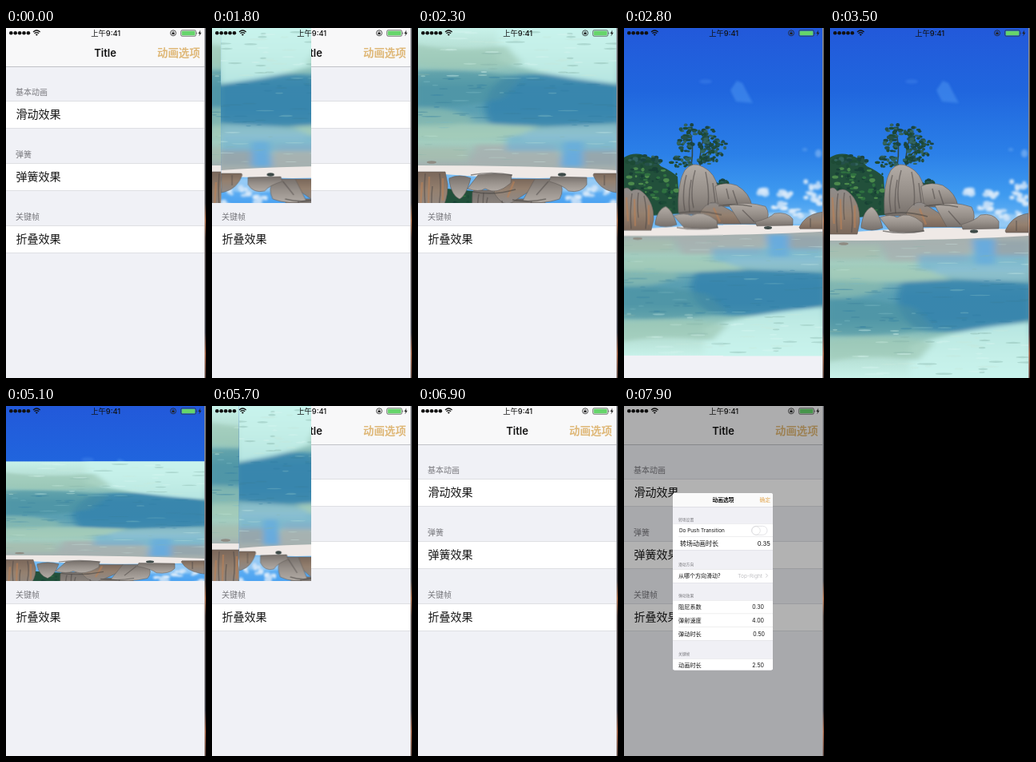
Animation of 250 by 438 pixels, one loop 8 s. Source, as an HTML page:

```html
<!DOCTYPE html>
<html lang="zh-CN">
<head>
<meta charset="utf-8">
<title>Fold transition</title>
<style>
html, body { margin: 0; width: 100%; height: 100%; overflow: hidden; background: #f0f1f6; }
svg { display: block; width: 100vw; height: 100vh; }
text { font-family: Inter, "Noto Sans CJK SC", "Noto Sans CJK", sans-serif; white-space: pre; }
</style>
</head>
<body>
<svg viewBox="0 0 250 438" preserveAspectRatio="none">
  <defs>
    <linearGradient id="sky" x2="0" y2="1">
      <stop stop-color="#2259da"/><stop offset=".3" stop-color="#2066de"/>
      <stop offset=".6" stop-color="#2b80e8"/><stop offset=".8" stop-color="#3f9bf0"/>
      <stop offset="1" stop-color="#82c4f6"/>
    </linearGradient>
    <linearGradient id="sea" x2="0" y2="1">
      <stop stop-color="#a7adac"/><stop offset=".1" stop-color="#9fbab6"/>
      <stop offset=".2" stop-color="#a3cdbf"/><stop offset=".3" stop-color="#79b1b8"/>
      <stop offset=".42" stop-color="#5a9fb2"/><stop offset=".58" stop-color="#5b9fae"/>
      <stop offset=".72" stop-color="#94c6bd"/><stop offset=".85" stop-color="#b5ded3"/>
      <stop offset="1" stop-color="#c8f2ea"/>
    </linearGradient>
    <linearGradient id="rock" x2="0" y2="1">
      <stop stop-color="#b3aca6"/><stop offset=".55" stop-color="#968f89"/><stop offset="1" stop-color="#77706b"/>
    </linearGradient>
    <linearGradient id="warm" x2="0" y2="1">
      <stop stop-color="#8f8c8b"/><stop offset=".6" stop-color="#94806f"/><stop offset="1" stop-color="#7a675a"/>
    </linearGradient>
    <linearGradient id="edge" x2="0" y2="1">
      <stop stop-color="#55565a"/><stop offset=".5" stop-color="#3c3b3e"/>
      <stop offset=".55" stop-color="#a0623e"/><stop offset=".6" stop-color="#443a38"/>
      <stop offset=".87" stop-color="#33333a"/><stop offset=".93" stop-color="#96573a"/>
      <stop offset="1" stop-color="#4a3630"/>
    </linearGradient>
    <filter id="soft" x="-50%" y="-50%" width="200%" height="200%"><feGaussianBlur stdDeviation="1.5"/></filter>
    <filter id="haze" x="-30%" y="-60%" width="160%" height="220%"><feGaussianBlur stdDeviation="5 2.5"/></filter>
    <clipPath id="frame"><rect width="248" height="438"/></clipPath>
    <clipPath id="topLeft"><rect width="124" height="219"/></clipPath>
    <clipPath id="topRight"><rect x="124" width="124" height="219"/></clipPath>
    <clipPath id="lowLeft"><rect y="219" width="124" height="219"/></clipPath>
    <clipPath id="lowRight"><rect x="124" y="219" width="124" height="219"/></clipPath>
    <clipPath id="card"><rect x="61" y="109" width="125" height="221.5" rx="2.5"/></clipPath>
    <g id="photo" clip-path="url(#frame)"></g>
  </defs>

  <g id="list"></g>

  <g id="book">
    <use href="#photo" clip-path="url(#topLeft)"/>
    <g class="low"><use href="#photo" clip-path="url(#lowLeft)"/></g>
    <g id="right">
      <use href="#photo" clip-path="url(#topRight)"/>
      <g class="low"><use href="#photo" clip-path="url(#lowRight)"/></g>
    </g>
  </g>

  <g id="status"></g>
  <rect id="dim" width="248" height="438"/>
  <g id="panel"><g id="panelBody" clip-path="url(#card)"></g></g>
  <rect x="248.4" width="1.6" height="438" fill="url(#edge)"/>
</svg>

<script>
const LOOP = 8000, FOLD = 588;
const NS = 'http://www.w3.org/2000/svg';
const $ = id => document.getElementById(id);

function add(parent, tag, attrs, content) {
  const el = document.createElementNS(NS, tag);
  for (const k in attrs) el.setAttribute(k, attrs[k]);
  if (content) el.textContent = content;
  parent.appendChild(el);
  return el;
}
const rect = (p, x, y, width, height, fill, more) => add(p, 'rect', { x, y, width, height, fill, ...more });
const path = (p, d, fill, more) => add(p, 'path', { d, fill, ...more });
const blob = (p, cx, cy, rx, ry, fill, more) => add(p, 'ellipse', { cx, cy, rx, ry, fill, ...more });
const text = (p, s, x, y, size, fill, more) => add(p, 'text', { x, y, 'font-size': size, fill, ...more }, s);

function makeRandom(seed) {
  return () => (seed = (seed * 16807) % 2147483647) / 2147483647;
}

const rnd = makeRandom(41);

// Small leaves or puffs scattered inside an ellipse
function scatter(g, [x, y, rx, ry], count, size, colours) {
  for (let i = 0; i < count; i++) {
    const a = rnd() * 2 * Math.PI, r = Math.sqrt(rnd());
    blob(g, x + rx * r * Math.cos(a), y + ry * r * Math.sin(a),
      size * (.6 + rnd() * .6), size * (.4 + rnd() * .5), colours[i % colours.length]);
  }
}

function drawSky(g) {
  rect(g, 0, 0, 248, 262, 'url(#sky)');
  const clouds = add(g, 'g', { filter: 'url(#soft)' });
  blob(clouds, 102, 67, 8, 2.5, '#4f8ff0', { opacity: .35 });
  path(clouds, 'M133 78L141 66L148 69L153 79L161 94L140 92Z', '#4a94f0', { opacity: .55 });
  blob(clouds, 243, 157, 4, 5, '#7db4f4', { opacity: .7 });
  blob(clouds, 226, 152, 3, 2, '#7db4f4', { opacity: .4 });
  blob(clouds, 205, 241, 50, 9, '#a5d2f6', { opacity: .7 });
  const puffs = add(g, 'g', { filter: 'url(#soft)', opacity: .85 });
  for (const p of [[173, 207, 6, 5], [200, 208, 10, 4], [236, 199, 12, 13], [238, 214, 13, 7], [194, 223, 14, 4], [220, 233, 18, 5]])
    scatter(puffs, p, 9, 4, ['#e9f2fb', '#d4e6f8', '#f4f8fc']);
}

function drawTrees(g) {
  path(g, 'M84 172Q88 148 82 130M95 174Q94 148 103 130M96 162Q106 154 118 148', 'none',
    { stroke: '#2f4646', 'stroke-width': 1.6 });
  const dark = ['#1b443f', '#255049', '#1d4a35', '#32625c'];
  for (const p of [[80, 129, 10, 9], [77, 144, 9, 12], [104, 132, 11, 10], [101, 146, 9, 10], [118, 149, 11, 11], [72, 167, 16, 8], [105, 164, 13, 8], [122, 194, 8, 4]])
    scatter(g, p, 24, 2.8, dark);
  path(g, 'M0 162Q12 155 24 159Q38 162 46 173Q58 178 67 186L70 234L0 240Z', '#22503b');
  scatter(g, [24, 166, 25, 7], 30, 3, dark);
  for (let i = 0; i < 90; i++) {
    const x = rnd() * 66;
    blob(g, x, 167 + x * .22 + rnd() * 50, 1 + rnd() * 3, 1 + rnd() * 1.6,
      ['#2f7140', '#183f35', '#1b4a36', '#4c8a4c'][i % 4]);
  }
}

function drawSea(g) {
  rect(g, 0, 260, 248, 178, 'url(#sea)');
  const bands = add(g, 'g', { filter: 'url(#haze)' });
  const band = (d, fill, opacity) => path(bands, d, fill, { opacity });
  band('M64 266H180L170 292H72Z', '#a9b0b0', .75);
  band('M178 264H206V296H182Z', '#5fa9e4', .85);
  band('M206 266H250V286H206Z', '#94a3ac', .8);
  band('M110 284H250V305H110Z', '#6cb0d8', .6);
  band('M-5 272H62V288H-5Z', '#a9bfae', .7);
  band('M-5 300Q70 294 130 304L150 314Q60 322 -5 316Z', '#a8cfba', .8);
  band('M130 298H250V316Q180 318 130 308Z', '#8fc4d6', .6);
  band('M90 318Q170 312 252 320V364Q200 386 110 378Q70 350 90 318Z', '#2c7eac', .75);
  band('M-5 340Q50 336 105 350L130 376Q60 388 -5 384Z', '#4a92a2', .6);
  band('M-5 316Q40 312 72 322Q50 340 -5 338Z', '#8abdb0', .7);
  band('M100 398Q170 374 252 368V440H100Z', '#c8f4ee', .8);
  band('M-5 392Q60 382 130 394L110 416Q50 406 -5 418Z', '#9dc8b6', .7);
  for (let i = 0; i < 130; i++) {
    const near = rnd(), deep = near > .25 && near < .65;
    blob(g, rnd() * 248, 270 + near * 164, 3 + rnd() * 11, .4 + near * .9,
      deep ? ['#2f7ca2', '#7bb8c2', '#39809c'][i % 3] : ['#c6e8dd', '#87b5aa', '#d6f5ef'][i % 3],
      { opacity: .4 });
  }
}

function drawShore(g) {
  path(g, 'M0 258Q80 250 150 250L248 252V260Q150 266 0 266Z', '#efe9e6');
  const rocks = [
    ['M0 201Q5 198 9 204Q17 199 24 206Q38 218 37 243L34 258H0Z', 'warm'],
    ['M68 232Q66 194 76 178Q86 166 99 174Q114 181 118 202L125 235H70Z', 'rock'],
    ['M114 198Q126 192 141 197Q158 207 160 224H118Z', 'rock'],
    ['M39 247Q42 228 52 224Q60 228 66 250Q52 256 39 250Z', 'rock'],
    ['M95 232Q107 211 121 222L146 238V249H100Z', 'warm'],
    ['M131 222Q154 216 177 224Q184 236 176 249H146Z', 'rock'],
    ['M62 237Q76 232 84 237Q98 228 116 244L117 254Q94 257 75 254Z', 'rock'],
    ['M164 246Q182 241 188 234Q204 231 211 242V251L166 252Z', 'rock'],
    ['M219 254Q226 237 243 233L248 232V256H220Z', 'warm']
  ];
  for (const [d, fill] of rocks) path(g, d, `url(#${fill})`, { stroke: '#5f5a56', 'stroke-width': .6 });
  path(g, 'M78 184Q72 206 76 230M84 190Q80 210 82 232M89 178Q82 204 87 226M102 180Q107 204 105 222M111 194L114 218M10 207Q7 230 9 256M18 206Q16 222 18 240M25 210Q30 232 27 256M128 201L131 214M136 203L142 221M148 229L163 246M233 241V254',
    'none', { stroke: '#4f4a47', 'stroke-width': 1.5, opacity: .55 });
  path(g, 'M3 212L5 245M13 214L14 252M31 222L31 250M112 226L120 246', 'none',
    { stroke: '#b98058', 'stroke-width': 2.5, opacity: .6 });
  path(g, 'M69 233Q95 228 122 236M118 223Q140 219 160 224M66 254Q92 259 118 254', 'none',
    { stroke: '#4a4744', 'stroke-width': 1.6, opacity: .6 });
  blob(g, 180, 254.5, 5, 2.2, '#3e4a48');
  blob(g, 17, 270, 6, 1.8, '#8e8b82');
}

function drawPhoto(g) {
  drawSky(g);
  drawTrees(g);
  drawSea(g);
  drawShore(g);
}

let highlight;
function drawList(g) {
  rect(g, 0, 0, 250, 438, '#f0f1f6');
  rect(g, 0, 0, 248, 48, '#f8f8f9');
  rect(g, 0, 48, 248, .7, '#aeafb3');
  text(g, 'Title', 124, 36, 13, '#111', { 'font-weight': 600, 'text-anchor': 'middle' });
  text(g, '动画选项', 189, 36, 13.4, '#dfb878', { 'font-weight': 700 });
  [['基本动画', '滑动效果'], ['弹簧', '弹簧效果'], ['关键帧', '折叠效果']].forEach(([head, label], i) => {
    const y = 91.5 + i * 78;
    text(g, head, 12, y - 7.7, 10, '#77777c');
    rect(g, 0, y, 248, 34, '#fff');
    if (i === 2) highlight = rect(g, 0, y, 248, 34, '#d9d9d9', { opacity: 0 });
    rect(g, 0, y - .2, 248, .6, '#cfcfd4');
    rect(g, 0, y + 33.7, 248, .6, '#cfcfd4');
    text(g, label, 12.5, y + 21.7, 14, '#161616');
  });
}

function drawStatus(g) {
  for (let i = 0; i < 5; i++) add(g, 'circle', { cx: 6.3 + i * 5.4, cy: 6.2, r: 2.3, fill: '#111' });
  path(g, 'M34 4.9Q38.3 1.2 42.6 4.9M35.5 6.8Q38.3 4.5 41.1 6.8', 'none', { stroke: '#111', 'stroke-width': 1.3 });
  path(g, 'M36.7 8L38.3 9.8L39.9 8Q38.3 6.8 36.7 8Z', '#111');
  text(g, '上午9:41', 124.7, 9.7, 9.3, '#111', { 'text-anchor': 'middle', 'font-weight': 500 });
  add(g, 'circle', { cx: 209, cy: 6.3, r: 3.5, fill: 'none', stroke: '#222', 'stroke-width': .8 });
  rect(g, 207.4, 5.8, 3.2, 2.3, '#222');
  path(g, 'M208.1 6V5Q209 3.8 209.9 5V6', 'none', { stroke: '#222', 'stroke-width': .6 });
  rect(g, 218.7, 2.8, 18.6, 7.4, 'none', { rx: 1.5, stroke: '#333', 'stroke-width': .7 });
  rect(g, 219.7, 3.8, 16.6, 5.4, '#66d56b', { rx: .6 });
  path(g, 'M238 5.2Q239.4 6.5 238 7.8Z', '#333');
  path(g, 'M243 2.5L240.3 6.9H242L241.3 10.3L244.3 5.7H242.5Z', '#222');
}

function drawPanel(g) {
  rect(g, 61, 109, 125, 222, '#f0f0f5');
  rect(g, 61, 109, 125, 17, '#fafafa');
  rect(g, 61, 126, 125, .4, '#c5c5ca');
  text(g, '动画选项', 124, 120, 6.8, '#111', { 'text-anchor': 'middle', 'font-weight': 600 });
  text(g, '确定', 169.5, 120, 6.8, '#e2a650');

  const head = (s, y) => text(g, s, 68, y, 4.8, '#77777c');
  const cells = (y, heights) => {
    rect(g, 61, y, 125, heights.reduce((a, b) => a + b), '#fff');
    rect(g, 61, y, 125, .4, '#d4d4d8');
    heights.forEach((h, i) => {
      y += h;
      const x = i < heights.length - 1 ? 68 : 61;
      rect(g, x, y, 186 - x, .4, '#d4d4d8');
    });
  };
  const row = (label, y, value, right = 175, size = 7.2, x = 68) => {
    text(g, label, x, y, size, '#111');
    if (value) text(g, value, right, y, size - .2, '#111', { 'text-anchor': 'end' });
  };

  head('转场设置', 144);
  cells(147, [16.5, 16.5]);
  row('Do Push Transition', 158.3, '', 0, 6.4, 69);
  rect(g, 159.5, 150.3, 19.5, 11, '#fff', { rx: 5.5, stroke: '#dcdce0', 'stroke-width': .8 });
  add(g, 'circle', { cx: 165.1, cy: 155.9, r: 5.2, fill: '#fff', stroke: '#c9c9cd', 'stroke-width': .5 });
  row('转场动画时长', 174.8, '0.35', 183, 8, 70);

  head('滑动方向', 200);
  cells(204.5, [16.5]);
  row('从哪个方向滑动?', 214.7, '', 0, 7);
  text(g, 'Top-Right', 173, 214.5, 6.6, '#c0c0c4', { 'text-anchor': 'end' });
  path(g, 'M177.3 209.8L179.5 212.2L177.3 214.6', 'none', { stroke: '#c0c0c4', 'stroke-width': .8 });

  head('弹动效果', 239);
  cells(243, [16.7, 16.7, 16.7]);
  row('阻尼系数', 253.6, '0.30');
  row('弹射速度', 270.8, '4.00');
  row('弹动时长', 287.8, '0.50', 176);

  head('关键帧', 312);
  cells(316, [16.5]);
  row('动画时长', 326.8, '2.50');
}

drawPhoto($('photo'));
drawList($('list'));
drawStatus($('status'));
drawPanel($('panelBody'));
const lows = document.querySelectorAll('.low');

const clamp = v => Math.min(1, Math.max(0, v));
const turn = v => -Math.cos(Math.PI * clamp(v)); // -1 folded, 1 open
const easeOut = v => 1 - (1 - clamp(v)) ** 3;

function render(t) {
  // 0: quarter in place, 1: opened sideways, 2: opened downwards
  const open = t < 4000 ? (t - 1720) / FOLD : (5842 - t) / FOLD;
  const enter = turn(open + 1), across = turn(open), down = turn(open - 1);
  $('book').style.display = enter > 0.001 ? '' : 'none';
  $('book').setAttribute('transform', `scale(${enter} 1)`);
  $('right').setAttribute('transform', `translate(124 0) scale(${across} 1) translate(-124 0)`);
  for (const el of lows)
    el.setAttribute('transform', `translate(0 219) scale(1 ${down}) translate(0 -219)`);

  highlight.setAttribute('opacity', t < 300 ? 0 : 1 - clamp((t - 550) / 400));

  const shown = easeOut((t - 7250) / 400);
  $('dim').setAttribute('opacity', .3 * shown);
  const scale = .8 + .2 * shown;
  $('panel').setAttribute('opacity', shown);
  $('panel').setAttribute('transform', `translate(123.5 219.5) scale(${scale}) translate(-123.5 -219.5)`);
}

const start = performance.now();
function tick() {
  render((performance.now() - start) % LOOP);
  requestAnimationFrame(tick);
}
tick();
</script>
</body>
</html>
```
